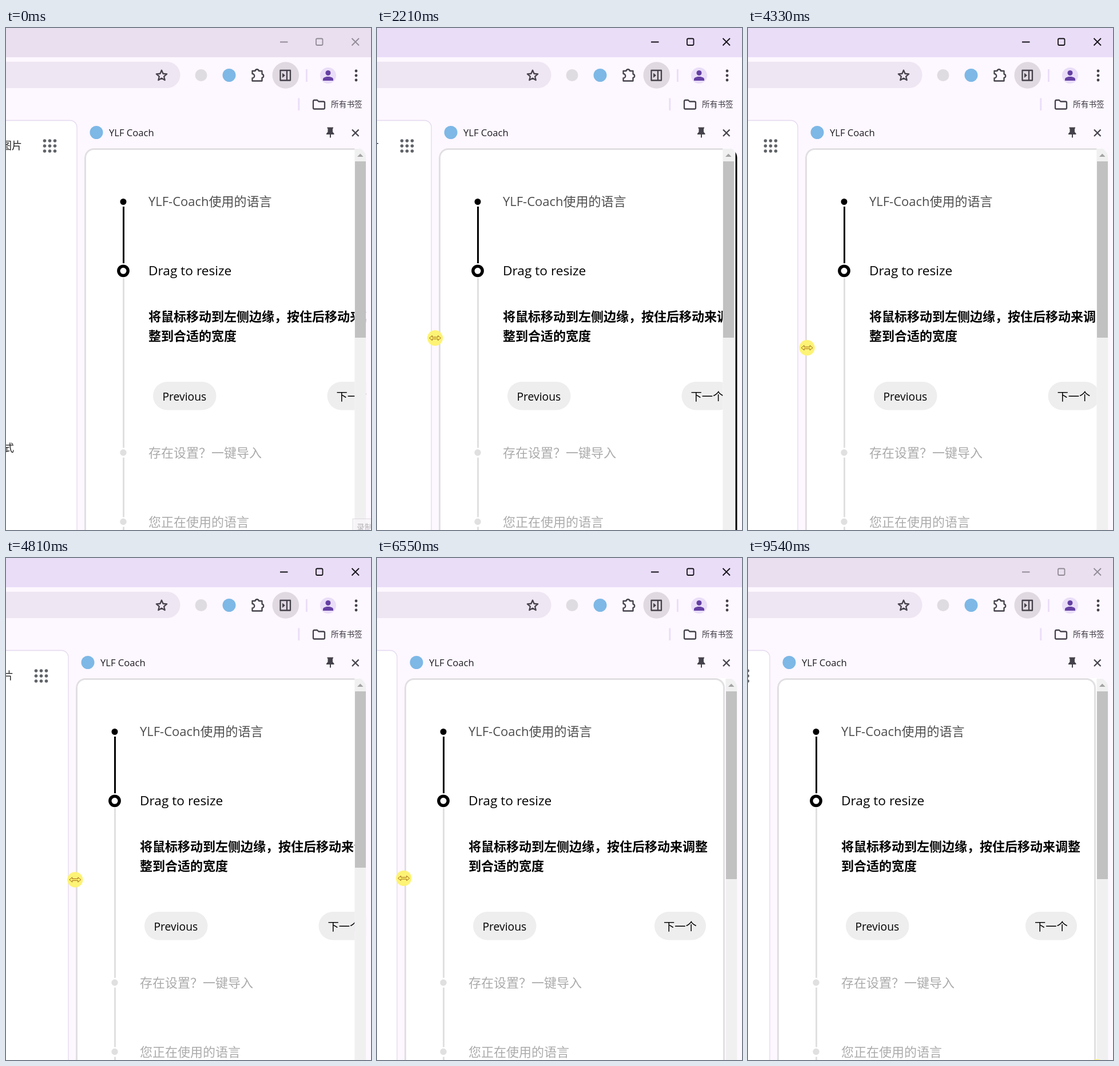
These frames come from a looping animation (638 by 877 pixels, 9.61 s). An HTML page:

```html
<!DOCTYPE html>
<html lang="zh-CN">
<head>
<meta charset="utf-8">
<title>Drag to resize</title>
<style>
html, body { margin: 0; width: 100%; height: 100%; overflow: hidden; background: #fdf7ff; }
svg { display: block; width: 100vw; height: 100vh; }
text { font-family: "Open Sans", "Noto Sans CJK SC", "Noto Sans CJK", sans-serif; font-size: 22px; white-space: pre; }
.line { fill: none; stroke: #46424b; stroke-width: 2.3; stroke-linejoin: round; }
.small { font-size: 13.7px; }
.page { font-size: 18px; }
.title { font-size: 16.6px; }
.button { font-size: 19.3px; }
</style>
</head>
<body>
<svg viewBox="0 0 638 877" xmlns="http://www.w3.org/2000/svg">
  <defs><clipPath id="panelClip"><rect id="clipBox" y="209.5" height="700" rx="17"/></clipPath></defs>
  <rect width="638" height="877" fill="#fdf7ff"/>

  <rect id="titleBar" width="638" height="51"/>
  <g id="winButtons" fill="none" stroke-width="1.8">
    <path d="M479 24.5H492.5M604.5 18L617 30.5M617 18L604.5 30.5"/>
    <rect x="542" y="18.5" width="11.5" height="11.5" rx="2"/>
  </g>

  <rect x="-40" y="59" width="344.5" height="46" rx="23" fill="#eee6f2"/>
  <polygon id="star" class="line"/>
  <circle cx="341" cy="82.5" r="10.5" fill="#dfdce1"/>
  <circle cx="390" cy="82.5" r="11.5" fill="#7db8e6"/>
  <path class="line" d="M430.5 75H435.5A3.3 3.3 0 0 1 442 75H447.5V80.5A3.3 3.3 0 0 1 447.5 87V92.5H430.5V87.5A3.7 3.7 0 0 0 430.5 80Z"/>
  <circle cx="488.8" cy="82.5" r="23.3" fill="#e0d9e2"/>
  <path class="line" d="M479.5 74H497V91.5H479.5ZM491 74V91.5"/>
  <path d="M483 78.5L488 82.8L483 87Z" fill="#46424b"/>
  <path d="M525.5 72V94M511.8 122.5V144" stroke="#eaddf8" stroke-width="2.8"/>
  <circle cx="563" cy="83" r="14" fill="#e9ddf8"/>
  <g fill="#6540a3"><circle cx="563" cy="78.5" r="4.5"/><path d="M554 92V89.5C554 83.5 572 83.5 572 89.5V92Z"/></g>
  <path d="M612 75V91.1" stroke="#46424b" stroke-width="4.8" stroke-linecap="round" stroke-dasharray="0 8"/>
  <path class="line" d="M537 128.5Q537 126 539 126H544L546.5 128.5H555Q557 128.5 557 130.5V139.5Q557 141.5 555 141.5H539Q537 141.5 537 139.5Z"/>
  <text class="small" x="568" y="138" fill="#3b3740">所有书签</text>

  <rect id="page" x="-400" y="161.5" height="760" rx="12" fill="#fff" stroke="#e4d9ee" stroke-width="1.3"/>
  <g id="pageItems">
    <text class="page" x="-8" y="212" fill="#222">图片</text>
    <text class="page" x="-4" y="740" fill="#222">式</text>
    <g id="apps" fill="#5f6368"></g>
  </g>

  <g id="head">
    <circle cx="34.5" cy="182.5" r="11.5" fill="#7db8e6"/>
    <text class="title" x="56.5" y="189" fill="#1d1b20">YLF Coach</text>
  </g>
  <path d="M561.5 173.5H572V175.5H571V181.5L573.5 184.5V186H568V191.5H566V186H560V184.5L562.5 181.5V175.5H561.5Z" fill="#46424b"/>
  <path class="line" d="M605 177.5L616.5 189M616.5 177.5L605 189"/>

  <g clip-path="url(#panelClip)">
    <rect y="200" width="640" height="700" fill="#fff"/>
    <rect id="card" y="211.5" height="900" rx="15" fill="#fff" stroke="#e1dfe2" stroke-width="3"/>
    <g id="steps">
      <g stroke-width="3">
        <path d="M-43.5 312V411" stroke="#000"/>
        <path d="M-43.5 437V733.5M-43.5 750.5V854.5M-43.5 871.5V890" stroke="#e0e0e0"/>
      </g>
      <circle cx="-44" cy="303.5" r="5.5"/>
      <circle cx="-44" cy="424.3" r="8.2" fill="#fff" stroke="#000" stroke-width="5.4"/>
      <g fill="#e0e0e0"><circle cx="-44" cy="741.8" r="5.7"/><circle cx="-44" cy="862.5" r="5.7"/></g>
      <text y="311" fill="#4d4d4d">YLF-Coach使用的语言</text>
      <text y="432" style="font-size:22.7px">Drag to resize</text>
      <text id="tip1" y="512" font-weight="700"></text>
      <text id="tip2" y="545.5" font-weight="700"></text>
      <rect x="8" y="618" width="110.5" height="49.5" rx="24.75" fill="#eee"/>
      <text class="button" x="24.5" y="650.5">Previous</text>
      <g fill="#ababab">
        <text y="750">存在设置？一键导入</text>
        <text y="871">您正在使用的语言</text>
      </g>
    </g>
    <g id="next">
      <rect y="618" width="90" height="49.5" rx="24.75" fill="#eee"/>
      <text class="button" x="16" y="650.5">下一个</text>
    </g>
    <g id="scroll">
      <rect y="200" width="22" height="700" fill="#fdf9ff"/>
      <rect y="211" width="20" height="700" fill="#f1f0f1"/>
      <path d="M4.5 225L9.8 219.5L15 225Z" fill="#a3a3a3"/>
      <rect id="thumb" x=".5" y="233" width="19" fill="#c1c1c1"/>
      <rect x="22" y="200" width="30" height="700"/>
    </g>
  </g>

  <g id="hint" opacity=".8">
    <rect x="606" y="857.5" width="60" height="40" fill="#f8f6f9" stroke="#d8d4da"/>
    <text class="small" x="613" y="876.5" fill="#a9a5ab">录制</text>
  </g>

  <path id="arrow" d="M.5 .5V15.5L4 12.3L6.3 18L8.6 17L6.3 11.5H10.8Z" fill="#fff" stroke="#000"/>
  <g id="sizer">
    <circle id="halo" r="13.6" fill="#fdf375"/>
    <path id="sizeArrow" d="M-10 0L-5 -4.2V-1.5H5V-4.2L10 0L5 4.2V1.5H-5V4.2Z"/>
  </g>
</svg>
<script>
const LOOP = 9610, STEP = 70;
const PRESS = 1650, RELEASE = 6970, CLICK = 9540;
const $ = id => document.getElementById(id);
const set = (id, attrs) => { for (const k in attrs) $(id).setAttribute(k, attrs[k]); };
const move = (id, x, y = 0) => set(id, { transform: `translate(${x} ${y})` });
const show = (id, on) => set(id, { display: on ? "inline" : "none" });
const range = n => [...Array(n).keys()];

// A track is a start point and successive moves; a bend above 1 slows the end
function at({ from: [x, y], moves }, t) {
  for (const { start, end, to, bend = 1 } of moves) {
    const p = Math.min(1, Math.max(0, (t - start) / (end - start)));
    const k = 1 - (1 - p) ** bend;
    x += (to[0] - x) * k;
    y += (to[1] - y) * k;
  }
  return [x, y];
}

// x is the page's right edge, y the height of the cursor
const drag = { from: [124, 574.5], moves: [
  { start: 1780, end: 2210, to: [95, 541] },
  { start: 2210, end: 3120, to: [40, 549] },
  { start: 3850, end: 4880, to: [110, 562], bend: 1.8 },
  { start: 5160, end: 5790, to: [98, 553], bend: 1.8 },
  { start: 5920, end: 6440, to: [33, 558] },
  { start: 6440, end: 6900, to: [38, 560.5], bend: 1.8 }
] };
const approach = { from: [612, 860], moves: [
  { start: 70, end: 970, to: [149, 542], bend: 1.5 },
  { start: 970, end: 1180, to: [140, 569] }
] };
const leave = { from: [60, 562], moves: [
  { start: 6970, end: 7110, to: [75, 569] },
  { start: 7440, end: 7650, to: [35, 659] },
  { start: 7650, end: 8280, to: [627, 73] },
  { start: 8280, end: 8420, to: [605, 176] },
  { start: 8420, end: 8800, to: [535, 510] },
  { start: 8800, end: 9340, to: [610, 889] }
] };
const tip = "将鼠标移动到左侧边缘，按住后移动来调整到合适的宽度";

function buildIcons() {
  const points = range(10).map(i => {
    const r = i % 2 ? 4.4 : 9.6, a = Math.PI * (i / 5 - .5);
    return [272 + r * Math.cos(a), 83.3 + r * Math.sin(a)];
  });
  set("star", { points: points.join(" ") });
  $("apps").innerHTML = range(9).map(i =>
    `<circle cx="${67.5 + i % 3 * 9}" cy="${197 + Math.floor(i / 3) * 9}" r="2.8"/>`).join("");
}

function drawWindow(t) {
  const active = t >= PRESS && t < CLICK;
  set("titleBar", { fill: active ? "#eaddf8" : "#e9dfee" });
  set("winButtons", { stroke: active ? "#141218" : "#918b96" });
  show("hint", t < STEP);
}

function drawPanel(t) {
  const [x] = at(drag, t), [before] = at(drag, t - STEP);
  const edge = Math.round(x);
  // The contents are laid out one step late while the panel widens
  const lag = Math.max(0, Math.round(before - x));
  const left = edge + 13, textX = edge + 125;
  const nextX = Math.max(textX + 312.5, 485 - lag);

  set("page", { width: edge + 400 });
  move("pageItems", edge + lag - 124);
  move("head", edge - .5);
  set("clipBox", { x: left, width: 629.5 - left });
  set("card", { x: left + 1.5, width: nextX + 120 - left });
  move("steps", textX);
  move("next", nextX);
  move("scroll", 609.5 - lag);
  set("thumb", { height: nextX > 486 ? 308 : 328 });

  const cut = edge <= 40 ? 19 : 18;
  $("tip1").textContent = tip.slice(0, cut);
  $("tip2").textContent = tip.slice(cut);
}

function drawCursor(t) {
  const sizing = t >= 1250 && t < RELEASE, click = t >= CLICK;
  const pressed = sizing && t >= PRESS;
  show("arrow", t >= STEP && !sizing && !click);
  show("sizer", sizing || click);
  show("halo", pressed || click);
  show("sizeArrow", sizing);
  set("sizeArrow", { fill: pressed ? "#fff36a" : "#fff", stroke: pressed ? "#a0681c" : "#000" });

  const [x, y] = at(drag, t + STEP);
  if (sizing) move("sizer", x + 10.8, y);
  else if (click) move("sizer", ...at(leave, t));
  else move("arrow", ...at(t < PRESS ? approach : leave, t));
}

function frame() {
  const t = performance.now() % LOOP;
  drawWindow(t);
  drawPanel(t);
  drawCursor(t);
  requestAnimationFrame(frame);
}
buildIcons();
frame();
</script>
</body>
</html>
```
